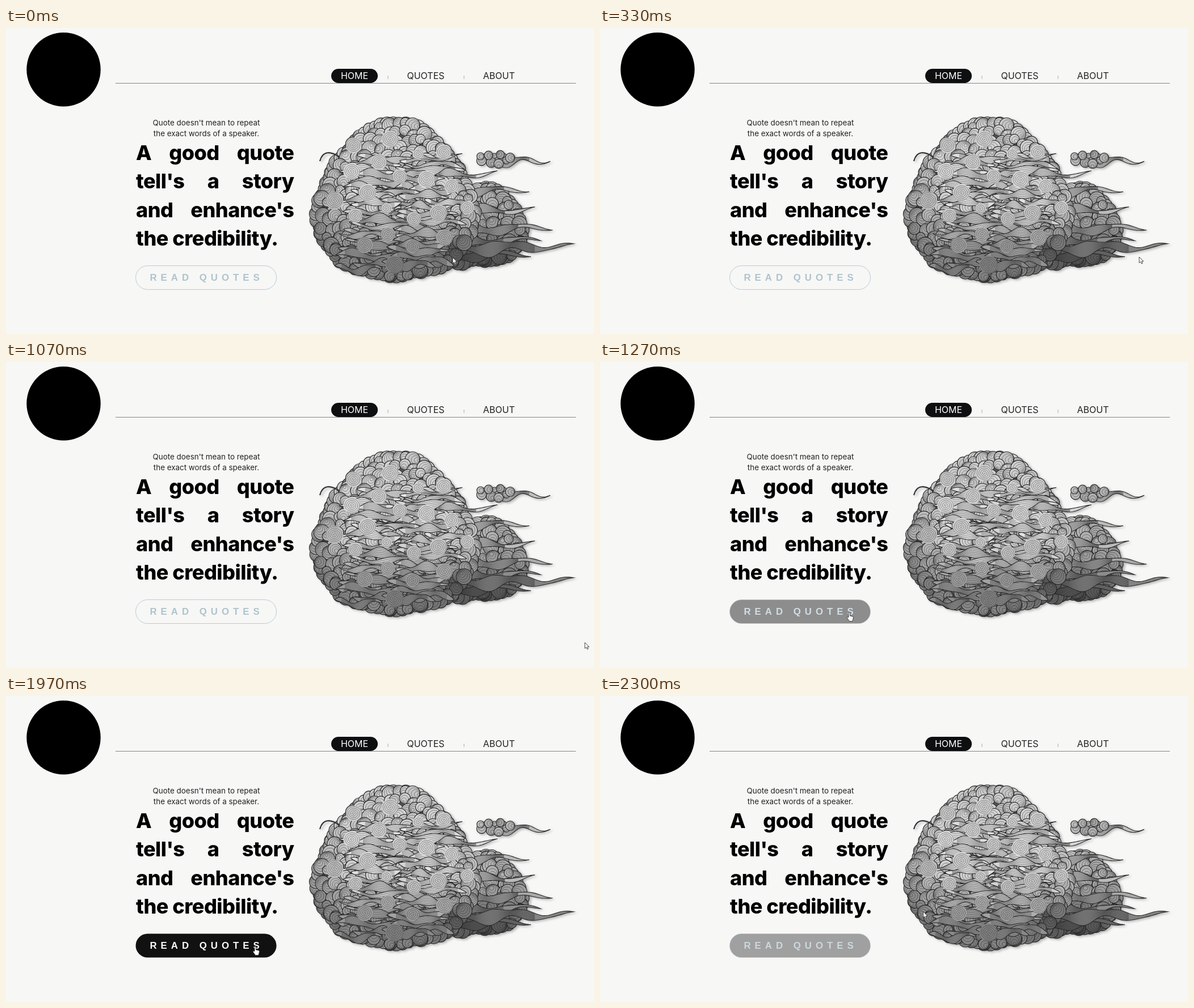
Animation of 1036 by 540 pixels, one loop 2330 ms. Source, as an HTML page with a canvas:

```html
<!DOCTYPE html>
<html lang="en">
<head>
<meta charset="utf-8">
<style>
html, body { margin: 0; width: 100%; height: 100%; overflow: hidden; background: #f7f7f6; }
body { font-family: Inter, sans-serif; }
canvas, svg, h1 { position: absolute; left: 0; top: 0; margin: 0; }
canvas { filter: drop-shadow(3px 2px 2px rgba(0,0,0,.28)); }
h1 { left: 229px; top: 194.7px; width: 278.5px; font: 800 36px/50.4px Inter, sans-serif; letter-spacing: -.5px; color: #000; }
h1 div { text-align-last: justify; white-space: nowrap; }
h1 div:last-child { text-align-last: left; }
text { text-anchor: middle; fill: #222; }
.nav { font-size: 16px; }
.lead { font-size: 13.4px; }
#label { font: bold 16.8px "Liberation Sans", Arial, sans-serif; letter-spacing: 7px; text-anchor: start; }
</style>
</head>
<body>
<canvas id="art" width="1036" height="540"></canvas>
<h1><div>A good quote</div><div>tell's a story</div><div>and enhance's</div><div>the credibility.</div></h1>
<svg width="1036" height="540">
  <circle cx="101.5" cy="73.3" r="65.2"/>
  <path d="M193 97.5H1004" stroke="#85857f"/>
  <path d="M673 84v6M807 84v6" stroke="#aaa"/>
  <rect x="573" y="72" width="82" height="25" rx="12.5" fill="#0d0f10"/>
  <g class="nav">
    <text x="614" y="90" style="fill:#fff">HOME</text>
    <text x="739.5" y="90">QUOTES</text>
    <text x="868.5" y="90">ABOUT</text>
  </g>
  <g class="lead">
    <text x="353" y="171.5">Quote doesn't mean to repeat</text>
    <text x="353" y="190.5">the exact words of a speaker.</text>
  </g>
  <rect id="pill" x="228.5" y="419.5" width="248" height="42" rx="21" fill="#111" stroke="#b3cdd8"/>
  <text id="label" x="253.5" y="446">READ QUOTES</text>
  <g id="cursor" fill="#fff" stroke="#333" stroke-width=".9" stroke-linejoin="round">
    <path id="arrow" d="M0 0V10.5L2.5 8.3L4.2 12L6 11.2L4.4 7.7H7.6Z"/>
    <path id="hand" d="M0 8.5V1a1.3 1.3 0 0 1 2.6 0V6L7 7q1.6.5 1.4 2L7.6 13L6.6 15.5H1.5L-2.6 10q-.8-1.8.8-2Z"/>
  </g>
</svg>
<script>
const $ = id => document.getElementById(id);
const c = $('art').getContext('2d');
const TAU = Math.PI * 2;
const smooth = v => (v = Math.max(0, Math.min(1, v)), v * v * (3 - 2 * v));
let seed = 11;
const rnd = (a, b) => {
  seed = (seed * 16807) % 2147483647;
  return a + (b - a) * seed / 2147483647;
};

// paper tone: lit from the upper middle, deep shade below the front mass
function tone(x, y, lift = 0) {
  const l = 203 + lift - 78 * smooth((y - 300) / 130) - 30 * smooth((x - 780) / 90)
    - 30 * smooth((610 - x) / 65)
    - 40 * Math.exp(-(((x - 810) / 50) ** 2) - ((y - 398) / 25) ** 2) + rnd(-9, 9);
  return `rgb(${l},${l},${l})`;
}

function ink(outer) {
  c.strokeStyle = outer ? '#262626' : 'rgba(35,35,35,.65)';
  c.lineWidth = outer ? 1.1 : .7;
  c.stroke();
}

function disc(x, y, r) {
  c.beginPath();
  c.arc(x, y, r, 0, TAU);
}

// shell of nested rings leaning to one side
function shell(x, y, r) {
  const lean = rnd(.5, .95), angle = rnd(0, TAU);
  for (let q = r; q > 1; q -= 2.8) {
    const d = (r - q) * lean;
    disc(x + Math.cos(angle) * d, y + Math.sin(angle) * d, q);
    c.fillStyle = tone(x, y);
    if (q === r) c.fill();
    ink(q === r);
  }
}

function spiral(x, y, r) {
  const start = rnd(0, TAU);
  disc(x, y, r);
  c.fillStyle = tone(x, y, 10);
  c.fill();
  c.beginPath();
  for (let q = r; q > 0; q -= .15) {
    const a = start + q / 3.2 * TAU;
    c.lineTo(x + Math.cos(a) * q, y + Math.sin(a) * q * .92);
  }
  ink(false);
}

// waving ribbon of parallel lines; a tail thins out to a point
function wisp(x0, y0, x1, y1, w, amp, waves, tail) {
  const phase = rnd(0, TAU);
  const trace = k => Array.from({ length: 51 }, (_, i) => {
    const t = i / 50, a = t * waves * TAU + phase;
    const lens = tail ? Math.min(1, t * 6) * (1 - t) ** .85 : Math.sin(Math.PI * t) ** .6;
    const half = w * lens * (.72 + .28 * Math.sin(a * 1.6));
    return [x0 + (x1 - x0) * t, y0 + (y1 - y0) * t + amp * Math.sin(a) + k * half];
  });
  const line = pts => pts.forEach(p => c.lineTo(...p));
  c.beginPath();
  line(trace(-1));
  line(trace(1).reverse());
  c.closePath();
  c.fillStyle = tone((x0 + x1) / 2, (y0 + y1) / 2, 18);
  c.fill();
  ink(true);
  const n = Math.max(2, Math.round(w * .62));
  for (let j = 1; j < n; j++) {
    c.beginPath();
    line(trace(j / n * 2 - 1).slice(tail ? 3 : 7, tail ? 34 : 44));
    ink(false);
  }
}

// rounded mass of shells, slightly wider at its lower corners
function mass(cx, cy, size) {
  const at = (a, inset) => {
    const r = size * (1 + .06 * Math.sin(3 * a) + .055 * Math.sin(a) + .012 * Math.sin(9 * a)) - inset;
    return [cx + r * Math.cos(a), cy + r * Math.sin(a)];
  };
  const shape = new Path2D();
  for (let a = 0; a < TAU; a += .05) shape.lineTo(...at(a, 10));
  c.fillStyle = '#555';
  c.fill(shape);
  for (let a = 0; a < TAU; a += 12 / size) shell(...at(a, 12), rnd(9, 13));
  for (let y = cy - size; y < cy + size; y += 15)
    for (let x = cx - size; x < cx + size; x += 15) {
      const px = x + rnd(-6, 6), py = y + rnd(-6, 6);
      if (c.isPointInPath(shape, px, py)) shell(px, py, rnd(8, 14));
    }
}

// the lower a tail ends, the longer and wider it is
function tail([x, y]) {
  const drop = y - 226;
  wisp(x - 90 - drop * .7, y + 4, x, y, 7 + drop * .07, 4.5, 1 + drop * .006, true);
}

function drawCloud() {
  const tips = [[804, 226], [866, 256], [922, 285], [932, 320], [925, 399], [942, 374], [963, 352], [1000, 385]];
  mass(844, 346, 76);
  mass(800, 385, 42);
  tips.slice(2).forEach(tail);
  mass(686, 302, 146);

  // wind across the front
  for (let y = 232; y < 422; y += 9)
    for (let x = 575 + rnd(0, 45); x < 745; x += rnd(70, 100)) {
      const len = rnd(75, 125), yy = y + rnd(-5, 5);
      wisp(x, yy, Math.min(x + len, 818), yy + rnd(0, 8), rnd(6, 10), rnd(3, 6), rnd(.9, 1.5));
    }
  tips.slice(0, 2).forEach(tail);

  // curls between the strands, spread by the golden angle
  for (let i = 1; i < 22; i++) {
    const r = 27 * Math.sqrt(i), a = i * 2.4;
    spiral(690 + r * Math.cos(a), 300 + r * Math.sin(a), rnd(9, 16));
  }

  // lock on the left
  c.beginPath();
  c.moveTo(553, 235);
  c.bezierCurveTo(558, 216, 572, 217, 588, 228);
  c.strokeStyle = '#333';
  c.lineWidth = 2.2;
  c.stroke();

  // small separate cloud
  wisp(850, 236, 959, 234, 10, 5, 1.6, true);
  for (let i = 0; i < 14; i++) {
    const r = Math.sqrt(i / 14), a = i * 2.4;
    shell(860 + 30 * r * Math.cos(a), 231 + 10 * r * Math.sin(a), rnd(6, 9));
  }
}
drawCloud();

// pointer stops: time, x, y
const stops = [[0, 787, 405], [330, 950, 404], [770, 1030, 514], [1070, 1020, 495],
  [1200, 438, 442], [2090, 438, 442], [2330, 575, 378]];

function pointer(t) {
  const i = stops.findIndex(s => s[0] > t);
  const [t0, x0, y0] = stops[i - 1], [t1, x1, y1] = stops[i];
  const k = smooth((t - t0) / (t1 - t0));
  return [x0 + (x1 - x0) * k, y0 + (y1 - y0) * k];
}

function draw(now) {
  const t = now % 2330;
  const on = smooth((t - 1153) / 250) - smooth((t - 2155) / 250);
  const over = t >= 1153 && t < 2155;
  const mix = (a, b) => a + (b - a) * on;
  $('pill').setAttribute('fill-opacity', on);
  $('pill').setAttribute('stroke-opacity', 1 - on);
  $('label').style.fill = `rgb(${mix(174, 250)},${mix(196, 250)},${mix(205, 250)})`;
  $('cursor').setAttribute('transform', `translate(${pointer(t)})`);
  $('arrow').style.display = over ? 'none' : '';
  $('hand').style.display = over ? '' : 'none';
  requestAnimationFrame(draw);
}
requestAnimationFrame(draw);
</script>
</body>
</html>
```
